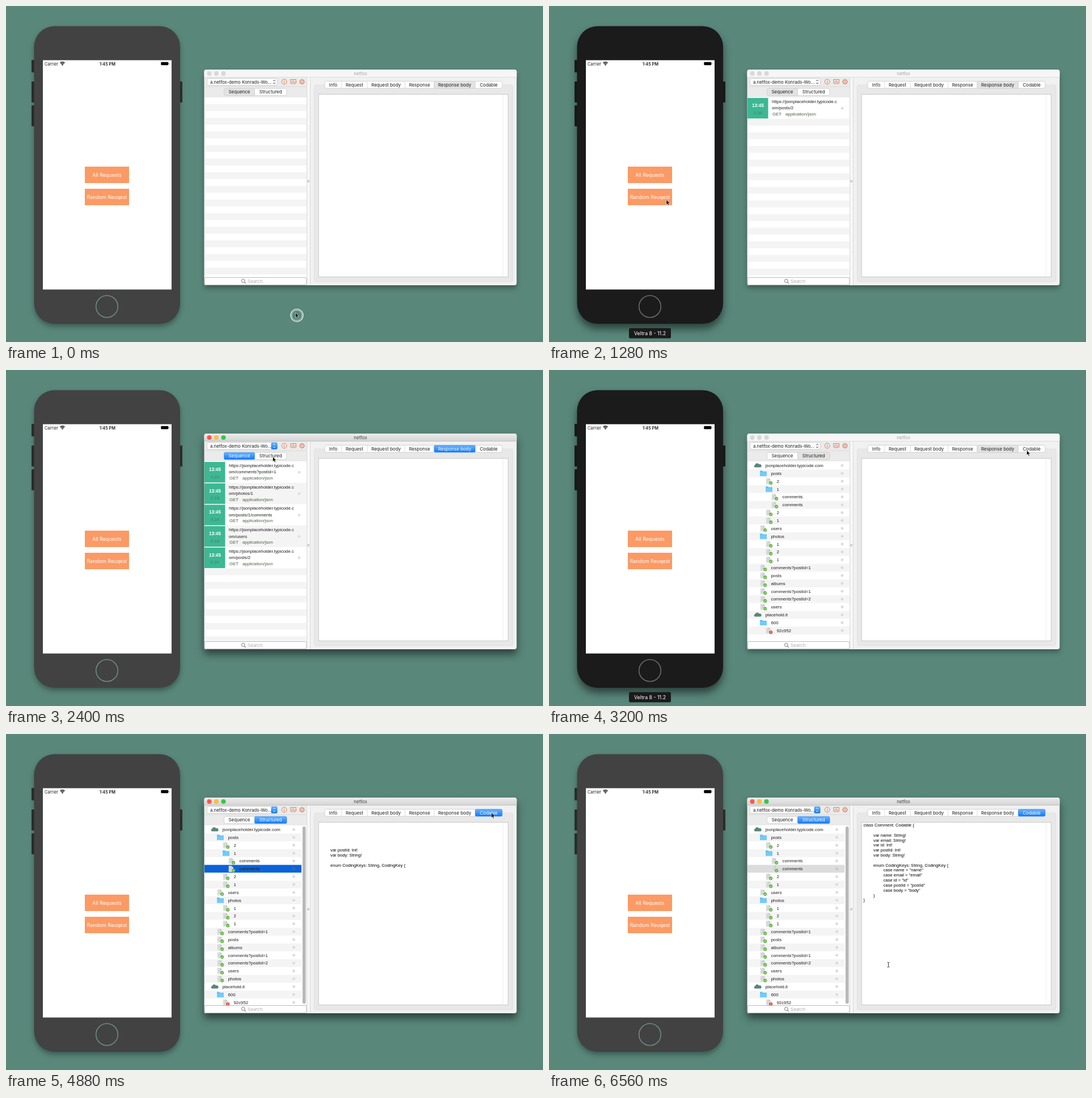
An HTML page for the animation above (6720 ms loop, 947 by 592 pixels).

```html
<!DOCTYPE html>
<html lang="en">
<head>
<meta charset="utf-8">
<title>Request inspector demo</title>
<style>
  html, body { margin: 0; width: 100%; height: 100%; overflow: hidden; background: #59877a; }
  svg { display: block; width: 947px; height: 592px; }
  text { font: 8px Inter, "Open Sans", sans-serif; fill: #1c1c1c; }
  .list { font: 7.8px "Liberation Sans", Arial, sans-serif; }
  .code { font: 7.6px "Liberation Sans", Arial, sans-serif; fill: #000; }
  .mid { text-anchor: middle; }
  .white { fill: #fff; }
  .app { font-size: 8.8px; }
  .status { font-size: 7.35px; }
  .bold { font-weight: 600; }
  .stamp { font: bold 8.2px "Liberation Sans", Arial, sans-serif; fill: #fff; }
  .took { font: 7.6px "Liberation Sans", Arial, sans-serif; fill: #4f7a6c; }
  .meta { font: 7.8px "Liberation Sans", Arial, sans-serif; fill: #4b5f4d; }
  .on { filter: drop-shadow(0 9px 7px rgba(0, 0, 0, .5)); }
  .off { filter: drop-shadow(0 5px 4px rgba(0, 0, 0, .32)); }
</style>
</head>
<body>
<svg viewBox="0 0 947 592">
  <defs>
    <linearGradient id="blue" x2="0" y2="1">
      <stop stop-color="#6bb3fb"/><stop offset="1" stop-color="#1079fb"/>
    </linearGradient>
    <linearGradient id="bar" x2="0" y2="1">
      <stop stop-color="#ececec"/><stop offset="1" stop-color="#d4d4d4"/>
    </linearGradient>
    <g id="cloud">
      <path d="M-5 3.2a2.4 2.4 0 0 1 .6-4.5A3.6 3.6 0 0 1 2.3-2 2.7 2.7 0 0 1 5 3.2Z" fill="#5a857a"/>
    </g>
    <g id="folder">
      <path d="M-6-4.6h4.2l1 1.2H6V4.6H-6Z" fill="#5bbcf2"/>
      <path d="M-6-2.4H6V4.6H-6Z" fill="#70cbfb"/>
    </g>
    <g id="page">
      <path d="M-5.3-5.4h5l3.2 3V5.4h-8.2Z" fill="#dcdfe0"/>
      <path d="M-.3-5.4v3h3.2Z" fill="#b4b9bb"/>
      <path d="M-3.8-2h2.6M-3.8 0H1M-3.8 2H0" stroke="#c3c8ca" stroke-width=".7"/>
    </g>
    <g id="file">
      <use href="#page"/>
      <circle cx="3.2" cy="3" r="3.1" fill="#64b53f"/>
      <path d="M1.7 3l1.1 1.2 2-2.3" fill="none" stroke="#fff" stroke-width=".9"/>
    </g>
    <g id="error">
      <use href="#page"/>
      <circle cx="3.2" cy="3" r="3.1" fill="#e0503c"/>
      <path d="M3.2 1.2v2.2M3.2 4v.8" stroke="#fff" stroke-width=".9"/>
    </g>
  </defs>
  <g id="scene"></g>
  <g id="cursor">
    <g id="ring" fill="none" stroke="#fff">
      <circle cx="2.5" cy="4.5" r="11" stroke-width="1.1"/>
      <circle cx="2.5" cy="4.5" r="9" stroke-width=".9" opacity=".8"/>
    </g>
    <path id="arrow" d="M0 0v8.6l2-1.8 1.5 3.2 1.4-.6L3.500 6.200H6.200Z" fill="#000" stroke="#fff" stroke-width=".6"/>
    <path id="beam" d="M-2-4.300q2 0 2 1.200q0-1.200 2-1.200M0-3.100V3.100M-2 4.300q2 0 2-1.200q0 1.200 2 1.200" fill="none" stroke="#222" stroke-width=".9"/>
  </g>
</svg>
<script>
const LOOP = 6720, STEP = 80;
const $ = id => document.getElementById(id);

const requests = [
  ['om/posts/2', '0.34'], ['om/users', '0.18'], ['om/posts/1/comments', '0.24'],
  ['om/photos/1', '0.18'], ['om/comments?postId=1', '0.24']
];
const arrivals = [1200, 1520, 1760, 1920, 2160];

// stage at which the node appears, depth, icon, label
const tree = `1 0 cloud jsonplaceholder.typicode.com
1 1 folder posts
1 2 file 2
1 2 folder 1
1 3 file comments
2 3 file comments
2 2 file 2
2 2 file 1
1 1 file users
1 1 folder photos
1 2 file 1
2 2 file 2
2 2 file 1
1 1 file comments?postId=1
2 1 file posts
2 1 file albums
2 1 file comments?postId=1
2 1 file comments?postId=2
2 1 file users
3 1 file photos
2 0 cloud placehold.it
2 1 folder 600
2 2 error 92c952`.split('\n').map(line => line.split(' '));
const stages = [2480, 2960, 3440];

const fields = ['name', 'email', 'id', 'postId', 'body'];
const code = [
  'class Comment: Codable {', '',
  ...fields.map(f => `\tvar ${f}: ${/id$/i.test(f) ? 'Int' : 'String'}!`), '',
  '\tenum CodingKeys: String, CodingKey {',
  ...fields.map(f => `\t\tcase ${f} = "${f}"`),
  '\t}', '}'
];

// time, x, y of the pointer tip
const path = [
  [0, 510.5, 540.5], [160, 510.5, 540.5], [800, 207, 341.5], [2000, 207, 341.5],
  [2320, 470.5, 153], [2480, 470.5, 153], [2800, 190, 295], [2880, 190, 295],
  [3200, 842.5, 141.5], [3440, 842.5, 141.5], [3840, 445.5, 231.5], [4160, 445.5, 231.5],
  [4720, 856, 139], [4960, 856, 139], [5440, 640, 300], [5840, 655, 350],
  [6080, 655, 350], [6480, 598.5, 406.5], [LOOP, 598.5, 406.5]
];

const rect = (x, y, w, h, fill, more = '') =>
  `<rect x="${x}" y="${y}" width="${w}" height="${h}" fill="${fill}" ${more}/>`;
const circle = (x, y, r, fill, more = '') =>
  `<circle cx="${x}" cy="${y}" r="${r}" fill="${fill}" ${more}/>`;
const text = (x, y, str, cls = '', more = '') =>
  `<text x="${x}" y="${y}" class="${cls}" ${more}>${str}</text>`;
const line = (d, stroke, w = 1) =>
  `<path d="${d}" fill="none" stroke="${stroke}" stroke-width="${w}"/>`;
const since = (times, t) => times.filter(s => t >= s).length;

function phone(active) {
  const side = (x, y, h) => rect(x, y, 5, h, active ? '#1d2020' : '#2e3131', 'rx="1"');
  const button = (y, label) => rect(139, y, 78, 29, '#fb9a64') + text(178, y + 18, label, 'app white mid');
  return side(45, 95, 22) + side(45, 133, 37) + side(45, 175, 37) + side(306, 133, 37) +
    rect(49.5, 35.5, 257.5, 524.5, active ? '#1b1b1b' : '#424242', `rx="36" class="${active ? 'on' : 'off'}"`) +
    rect(65, 95.500, 227, 404, '#fff') +
    circle(178, 529.5, 19.3, 'none', `stroke="${active ? '#6c6c6c' : '#6d8c82'}" stroke-width="1.6"`) +
    text(68, 104.500, 'Carrier', 'status') +
    line('M95.300 100.400q4.200-3.600 8.400 0M96.800 102q2.700-2.200 5.400 0', '#000', 1.2) +
    '<path d="M97.900 103.100q1.600-1.200 3.200 0l-1.600 1.800Z"/>' +
    text(179, 104.500, '1:45 PM', 'status bold mid') +
    rect(273.3, 98.8, 13, 5.4, '#000', 'rx="1.200"') + rect(287, 100.500, .9, 2, '#777') +
    button(283, 'All Requests') + button(322, 'Random Reuqest') +
    (active ? rect(141, 567.5, 74, 18, '#1b1b1b', 'rx="2.500"') + text(178, 580, 'Veltra 8 - 11.2', 'app white mid') : '');
}

function segments(edges, labels, chosen, y, active) {
  const left = edges[0], right = edges[edges.length - 1];
  let out = rect(left, y, right - left, 12.5, '#fff', 'rx="3" stroke="#c9c9c9" stroke-width=".8"');
  edges.slice(1, -1).forEach(x => out += line(`M${x} ${y}v12.500`, '#d4d4d4', .8));
  labels.forEach((label, i) => {
    const x = edges[i], w = edges[i + 1] - x, picked = i === chosen;
    if (picked) out += rect(x, y, w, 12.5, active ? 'url(#blue)' : '#e3e3e3',
      `rx="2" stroke="${active ? '#3d8ff0' : '#cacaca'}" stroke-width=".6"`);
    out += text(x + w / 2, y + 9.2, label, 'mid' + (picked && active ? ' white' : ''));
  });
  return out;
}

function stripes(y, height, index) {
  let out = '';
  for (; y < 478; y += height, index++)
    if (index % 2) out += rect(350, y, 180.5, Math.min(height, 478 - y), '#f4f4f4');
  return out;
}

function sequence(count) {
  const pitch = 37.7;
  let out = stripes(161 + count * pitch, 12, count);
  requests.slice(0, count).reverse().forEach(([url, took], i) => {
    const y = 161 + i * pitch;
    if (i % 2) out += rect(350, y, 180.5, pitch, '#f4f4f4');
    out += rect(350, y + 1, 36.5, 36.2, '#3cb892') +
      text(368.5, y + 17, '13:45', 'stamp mid') + text(368.5, y + 29.6, took, 'took mid') +
      text(393, y + 10, 'https://jsonplaceholder.typicode.c', 'list') +
      text(393, y + 21.4, url, 'list') + text(394, y + 32, 'GET', 'meta') +
      text(417, y + 32, 'application/json', 'meta') + circle(517, y + 19.2, 2.4, '#dedede');
  });
  return out;
}

function structure(stage, pick) {
  const pitch = 13.845, full = stage === 3;
  let out = stripes(161.4, pitch, 0);
  tree.filter(node => node[0] <= stage).forEach(([, depth, icon, label], i) => {
    const y = 168.3 + i * pitch;
    if (pick && i === 5) out += rect(350, y - 6.9, 171, 13.6, pick);
    out += `<use href="#${icon}" x="${368 + depth * 10}" y="${y}"/>` +
      text(381.5 + depth * 10, y + 2.8, label, 'list') +
      circle(full ? 507.5 : 517, y, 2.4, pick && i === 5 ? '#8884' : '#dadada');
  });
  if (full) out += rect(521, 161, 9.5, 317, '#fafafa') + rect(523, 163, 5.6, 312, '#b8b8b8', 'rx="2.800"');
  return out;
}

function toolbarIcons() {
  const c = '#dd7350';
  let gear = '';
  for (let a = 0; a < 360; a += 45)
    gear += `<path d="M522 128.800v1.500" stroke="${c}" stroke-width="1.500" transform="rotate(${a} 522 133.500)"/>`;
  return circle(490.7, 133.5, 4.5, 'none', `stroke="${c}" stroke-width=".9"`) +
    line('M490.700 132.700v3.300M490.700 130.800v1', c, 1) +
    rect(502, 129.5, 9.4, 6.4, 'none', `stroke="${c}" stroke-width=".9"`) +
    line('M503.500 133h2l1-1.800 1 3 .8-1.200h1.500M504 138.300l1.500-2M509.400 138.300l-1.500-2', c, .8) +
    gear + circle(522, 133.5, 3.6, 'none', `stroke="${c}" stroke-width=".9"`) +
    circle(522, 133.5, 1.4, 'none', `stroke="${c}" stroke-width=".8"`);
}

function inspector(s) {
  const { active } = s;
  const lights = active ? ['#fc5650', '#fdbc40', '#34c748'] : ['#d8d8d8', '#d8d8d8', '#d8d8d8'];
  let out = rect(349.5, 112, 551, 380, '#f1f1f1', `rx="4" class="${active ? 'on' : 'off'}"`) +
    `<path d="M349.500 125.500V116q0-4 4-4H896.500q4 0 4 4v9.500Z" fill="${active ? 'url(#bar)' : '#f6f6f6'}"/>` +
    line('M349.500 125.500H900.500', active ? '#bdbdbd' : '#d8d8d8', .8) +
    lights.map((c, i) => circle(358.5 + i * 12.5, 119, 4, c)).join('') +
    text(625, 122, 'netfox', 'mid', `style="fill:${active ? '#444' : '#a6a6a6'}"`);

  out += rect(350, 126, 180.5, 35, '#ebebeb') + line('M350 142H530.500', '#d6d6d6', .8) +
    rect(354.5, 127.500, 124, 12.3, '#fff', 'rx="3" stroke="#c4c4c4" stroke-width=".8"') +
    text(360, 136.5, 'a.netfox-demo Konrads-Wo...', '', 'style="font-size:7.8px"') +
    (active ? rect(467.500, 127.500, 11, 12.3, 'url(#blue)', 'rx="2.500"') : '') +
    line('M471.200 132.300l1.900-2 1.900 2M471.200 135l1.900 2 1.900-2', active ? '#fff' : '#333', 1) +
    toolbarIcons() +
    segments([384.5, 438.5, 495], ['Sequence', 'Structured'], s.stage ? 1 : 0, 145.2, active);

  out += rect(350, 161, 180.5, 317, '#fff') +
    '<g clip-path="inset(0)">' + (s.stage ? structure(s.stage, s.pick) : sequence(s.count)) + '</g>' +
    rect(350, 478, 180.5, 14, '#ebebeb') +
    rect(350.3, 478.5, 179.5, 12.8, '#fff', 'rx="2" stroke="#b5b5b5" stroke-width=".9"') +
    circle(418.3, 484.3, 2.9, 'none', 'stroke="#777" stroke-width="1"') + line('M420.400 486.500l2.400 2.400', '#777', 1.1) +
    text(426, 488, 'Search', '', 'style="fill:#adadad"');

  out += rect(531, 126, 5.5, 366, '#f7f7f7') + line('M530.700 126V492M536.500 126V492', '#d2d2d2', .8) +
    circle(533.2, 308.8, 2, '#c6c6c6') +
    rect(543.5, 139, 350.5, 347, '#e8e8e8', 'rx="3" stroke="#dddddd" stroke-width=".8"') +
    segments([562, 592, 637, 703.5, 755, 827.5, 875],
      ['Info', 'Request', 'Request body', 'Response', 'Response body', 'Codable'], s.tab, 132.5, active) +
    rect(551.2, 155.7, 334.3, 321.5, '#fff', 'stroke="#c2c2c2" stroke-width=".9"') +
    line('M876.500 156V477', '#ebebeb', .9);

  code.forEach((row, i) => {
    if (i < s.from || i >= s.to) return;
    const indent = row.lastIndexOf('\t') + 1;
    out += text(554.5 + indent * 17.6, 163.1 + i * 8.82, row.slice(indent), 'code');
  });
  return out;
}

function stateAt(t) {
  const phoneOn = (t >= 880 && t < 2320) || (t >= 2800 && t < 3440);
  return {
    phoneOn,
    active: t >= 160 && !phoneOn,
    count: since(arrivals, t),
    stage: since(stages, t),
    pick: t < 4160 ? '' : t < 5520 ? '#0a63d9' : '#dcdcdc',
    tab: t < 4880 ? 4 : 5,
    from: t < 4960 ? 5 : 0,
    to: t < 4880 ? 0 : t < 4960 ? 9 : code.length
  };
}

function pointerAt(t) {
  const i = path.findIndex(p => p[0] > t);
  const [t0, x0, y0] = path[i - 1], [t1, x1, y1] = path[i];
  const u = (t - t0) / (t1 - t0), k = u * u * (3 - 2 * u);
  return [x0 + (x1 - x0) * k, y0 + (y1 - y0) * k];
}

const show = (id, visible) => $(id).setAttribute('visibility', visible ? 'visible' : 'hidden');
let start, last;

function frame(now) {
  start ??= now;
  const t = Math.floor((now - start) % LOOP / STEP) * STEP;
  const s = stateAt(t), key = JSON.stringify(s);
  if (key !== last) {
    $('scene').innerHTML = phone(s.phoneOn) + inspector(s);
    last = key;
  }
  const [x, y] = pointerAt(t);
  const typing = s.active && x > 552 && x < 876 && y > 156 && y < 477;
  $('cursor').setAttribute('transform', `translate(${x} ${y})`);
  show('ring', t < STEP);
  show('arrow', !typing);
  show('beam', typing);
  requestAnimationFrame(frame);
}
requestAnimationFrame(frame);
</script>
</body>
</html>
```
